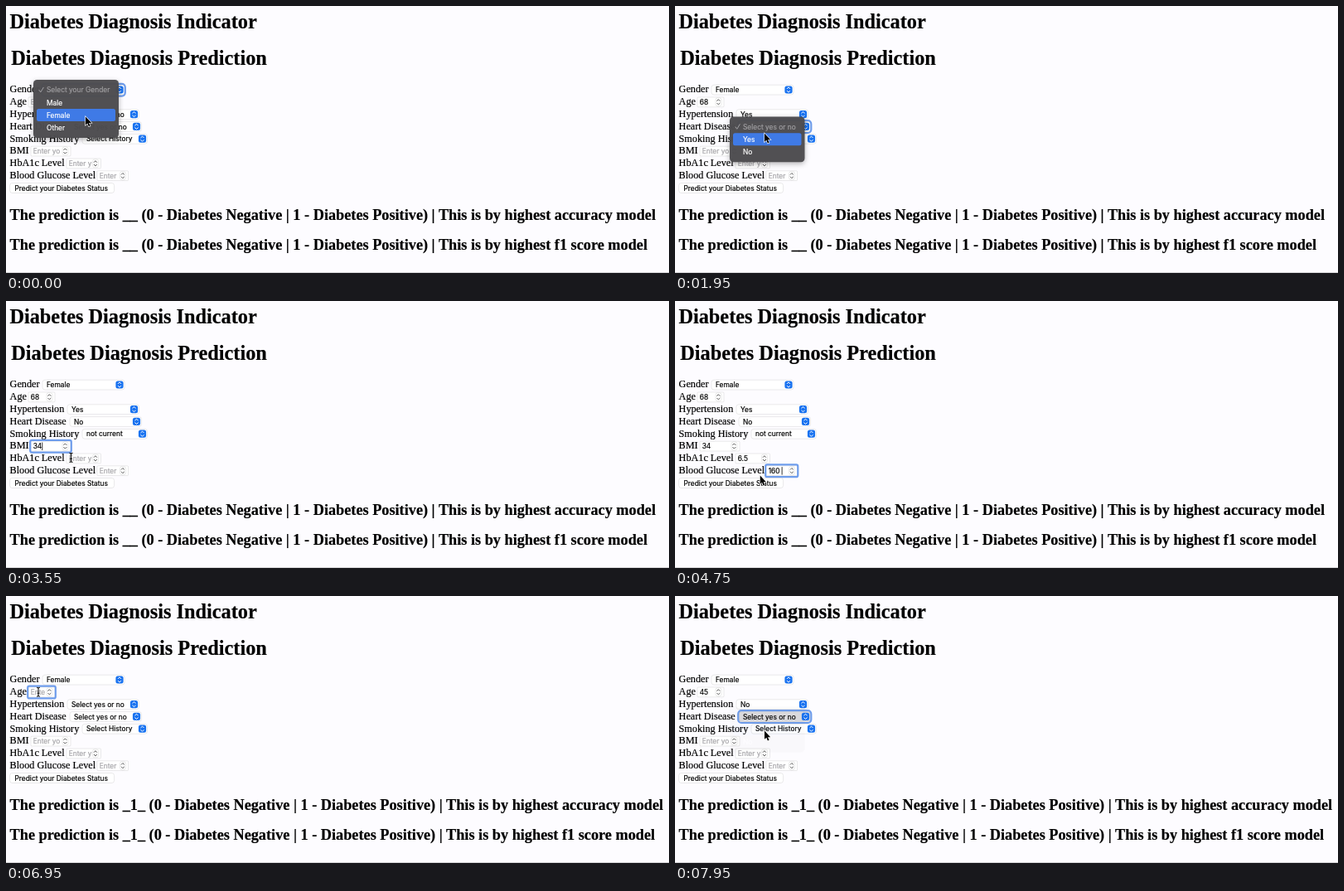
An HTML page that plays this animation: 800 by 322 pixels, repeating every 8 s.

```html
<!DOCTYPE html>
<html lang="en">
<head>
<meta charset="utf-8">
<title>Diabetes Diagnosis Prediction</title>
<style>
  html, body { margin: 0; width: 100%; height: 100%; overflow: hidden; background: #fdfcff; }
  svg { display: block; width: 800px; height: 322px; }
  text { font: 12.2px "Liberation Serif", "Times New Roman", serif; white-space: pre; stroke-width: .2; }
  .h1 { font-size: 24.31px; font-weight: bold; }
  .h3 { font-size: 18.26px; font-weight: bold; }
  .ui { font: 8.4px Inter, Roboto, sans-serif; }
  .box { fill: #fff; stroke: #000; stroke-opacity: .12; stroke-width: .7; }
  .pressed { fill: #dedde0; }
  .ring { fill: none; stroke: #6f9dec; stroke-width: 2.2; }
  .line { fill: none; stroke-linecap: round; stroke-linejoin: round; }
  .menu { filter: drop-shadow(0 2px 3px rgba(0, 0, 0, .3)); }
</style>
</head>
<body>
<svg id="stage" viewBox="0 0 800 322"></svg>
<script>
const LOOP = 8000, PITCH = 15.2, FADE = 60, KEY_DELAY = 200, KEY_TIME = 50;
const yesNo = ['Select yes or no', 'Yes', 'No'];
const button = { x: 4.6, y: 219.5, w: 126, aim: 69 };

// aim is where the pointer lands on the control
const rows = {
  gender: { label: 'Gender', x: 44, w: 99, aim: 96, items: ['Select your Gender', 'Male', 'Female', 'Other'] },
  age: { label: 'Age', x: 27, w: 32, aim: 39, hint: 'Ente' },
  hyper: { label: 'Hypertension', x: 74, w: 86.5, aim: 107, items: yesNo },
  heart: { label: 'Heart Disease', x: 77, w: 86.5, aim: 108, items: yesNo },
  smoking: { label: 'Smoking History', x: 92, w: 78.5, aim: 128,
    items: ['Select History', 'never', 'No Info', 'current', 'ever', 'former', 'not current'] },
  bmi: { label: 'BMI', x: 30, w: 48, aim: 55, hint: 'Enter yo' },
  hba1c: { label: 'HbA1c Level', x: 73, w: 41.5, aim: 80, hint: 'Enter y' },
  glucose: { label: 'Blood Glucose Level', x: 110, w: 37.5, aim: 125, hint: 'Enter' }
};
Object.values(rows).forEach((row, i) => row.y = 101 + 14.8 * i);

const pick = (name, start, end, item) => ({ name, start, end, item });
const type = (name, start, keys) =>
  ({ name, start, end: start + KEY_DELAY + keys.length * KEY_TIME, keys });

const steps = [
  pick('gender', -200, 150, 2), type('age', 700, '68'), pick('hyper', 1230, 1550, 1),
  pick('heart', 1880, 2300, 2), pick('smoking', 2530, 2900, 6), type('bmi', 3200, '34'),
  type('hba1c', 3560, '6.5'), type('glucose', 4250, '160'), { start: 5400, end: 6000, submit: true },
  pick('gender', 6300, 6550, 2), type('age', 6780, '45'), pick('hyper', 7350, 7500, 2),
  pick('heart', 7700, 7900, 1)
];

// The pointer reaches each control, moves to the chosen menu item and rests there
const path = steps.flatMap(({ name, start, end, item, submit }) => {
  const { aim, y } = submit ? button : rows[name];
  if (!item) return [[submit ? start - 450 : start, aim, y], [end, aim, y]];
  const itemY = y + PITCH * item + 2;
  return [[start, aim, y - 3], [start + .45 * (end - start), aim, itemY], [end, aim, itemY]];
});
path.push([LOOP, ...path[path.length - 1].slice(1)]);

function pointerAt(t) {
  const i = path.findIndex(p => p[0] > t);
  const [t0, x0, y0] = path[i - 1], [t1, x1, y1] = path[i];
  const u = (t - t0) / (t1 - t0), e = u * u * (3 - 2 * u);
  return [x0 + (x1 - x0) * e, y0 + (y1 - y0) * e];
}

function stateAt(t) {
  const s = { values: {}, result: '__', active: '', menu: null };
  for (const { name, start, end, item, keys, submit } of steps) {
    if (t < start) break;
    s.active = name;
    if (submit) {
      s.values = {};
      s.result = '_1_';
    } else if (keys) {
      s.values[name] = keys.slice(0, Math.max(0, Math.floor((t - start - KEY_DELAY) / KEY_TIME) + 1));
    } else if (t < end + FADE) {
      s.menu = { name, closing: t >= end, alpha: (1 - Math.max(0, t - end) / FADE) ** 2 };
    } else {
      s.values[name] = rows[name].items[item];
    }
  }
  return s;
}

const text = (x, y, s, cls = '', color = '#000') =>
  `<text x="${x}" y="${y}" class="${cls}" fill="${color}" stroke="${color}">${s}</text>`;
const rect = (x, y, w, h, r, attrs) =>
  `<rect x="${x}" y="${y}" width="${w}" height="${h}" rx="${r}" ${attrs}/>`;
const box = (x, y, w, h, r, pressed) => rect(x, y, w, h, r, `class="box ${pressed ? 'pressed' : ''}"`);
const line = (d, color) => `<path class="line" d="${d}" stroke="${color}"/>`;
const chevrons = (x, y, color) =>
  line(`M${x - 1.7} ${y - 1.4}l1.7 -1.7 1.7 1.7M${x - 1.7} ${y + 1.4}l1.7 1.7 1.7 -1.7`, color);

function drawRow({ label, x, y, w, items, hint }, value, focused, pressed) {
  const r = x + w;
  let s = text(4.6, y + 3.3, label) + box(x, y - 5.8, w, 11.8, items ? 3 : 1, pressed);
  if (items) {
    s += text(x + 5, y + 3.1, value || items[0], 'ui');
    s += rect(r - 10.6, y - 4.6, 9.2, 9.2, 2.5, 'fill="#1a73f0"') + chevrons(r - 6, y, '#fff');
  } else {
    s += text(x + 2.7, y + 3.4, value || hint, 'ui', value ? '#000' : '#a6a5a9');
    s += box(r - 10, y - 5, 7, 10, 2.5) + chevrons(r - 6.6, y, '#555');
    if (focused && value) s += rect(x + 2.8 + value.length * 5.3, y - 4.5, .8, 9.5, 0, '');
  }
  if (focused) s += rect(x - .8, y - 7.2, w + 1.6, 14.8, items ? 4 : 2, 'class="ring"');
  return s;
}

function drawMenu({ x, y, w, items }, alpha, pointerY) {
  const left = x - 11, width = w + 4;
  let s = rect(left, y - 12, width, PITCH * (items.length - 1) + 24.4, 4.5, 'fill="#4e4d50" fill-opacity=".97"');
  s += line(`M${left + 7} ${y + .5}l1.8 2.4 3.4 -5.6`, '#a09fa2');
  items.forEach((item, i) => {
    const cy = y + .2 + PITCH * i;
    if (i && Math.abs(pointerY - cy) <= PITCH / 2)
      s += rect(left + 4, cy - 7.5, width - 8, 15, 2.5, 'fill="#3f7ae6"');
    s += text(left + 16, cy + 3.1, item, 'ui', i ? '#fff' : '#a09fa2');
  });
  return `<g class="menu" opacity="${alpha}">${s}</g>`;
}

function drawPointer(x, y, beam) {
  const d = beam ? 'M-2 -5.5Q0 -5.5 0 -4V4Q0 5.5 -2 5.5M2 -5.5Q0 -5.5 0 -4M0 4Q0 5.5 2 5.5M-1.3 1.5H1.3'
    : 'M0 0V10.2L2.3 8.2 3.9 11.9 5.6 11.2 4 7.6H7.2Z';
  const style = beam ? 'fill="none" stroke="#111" stroke-width="1.1"'
    : 'stroke="#fff" stroke-width="1.2" paint-order="stroke"';
  return `<path transform="translate(${x} ${y})" d="${d}" ${style}/>`;
}

function draw(t) {
  const [px, py] = pointerAt(t);
  const { values, result, active, menu } = stateAt(t);
  const verdict = (y, model) => text(4.6, y,
    `The prediction is ${result} (0 - Diabetes Negative | 1 - Diabetes Positive) | This is by highest ${model} model`, 'h3');

  let s = rect(0, 0, 800, 322, 0, 'fill="#fdfcff"') + rect(0, 321, 800, 1, 0, 'fill="#d2d1d4"');
  s += text(4.4, 27, 'Diabetes Diagnosis Indicator', 'h1') + text(6.2, 71, 'Diabetes Diagnosis Prediction', 'h1');
  for (const name in rows)
    s += drawRow(rows[name], values[name], name === active, menu && menu.closing && menu.name === name);
  s += box(button.x, button.y - 6, button.w, 12, 3, t >= 5300 && t < 5400);
  s += text(10.5, 222.6, 'Predict your Diabetes Status', 'ui');
  s += verdict(258.3, 'accuracy') + verdict(294.3, 'f1 score');

  if (menu) s += drawMenu(rows[menu.name], menu.alpha, py);
  const beam = !menu && Object.values(rows).some(r =>
    r.hint && px > r.x && px < r.x + r.w - 8 && Math.abs(py - r.y) < 6.5);
  stage.innerHTML = s + drawPointer(px, py, beam);
}

const stage = document.getElementById('stage');
const start = performance.now();
function tick() {
  draw((performance.now() - start) % LOOP);
  requestAnimationFrame(tick);
}
tick();
</script>
</body>
</html>
```
